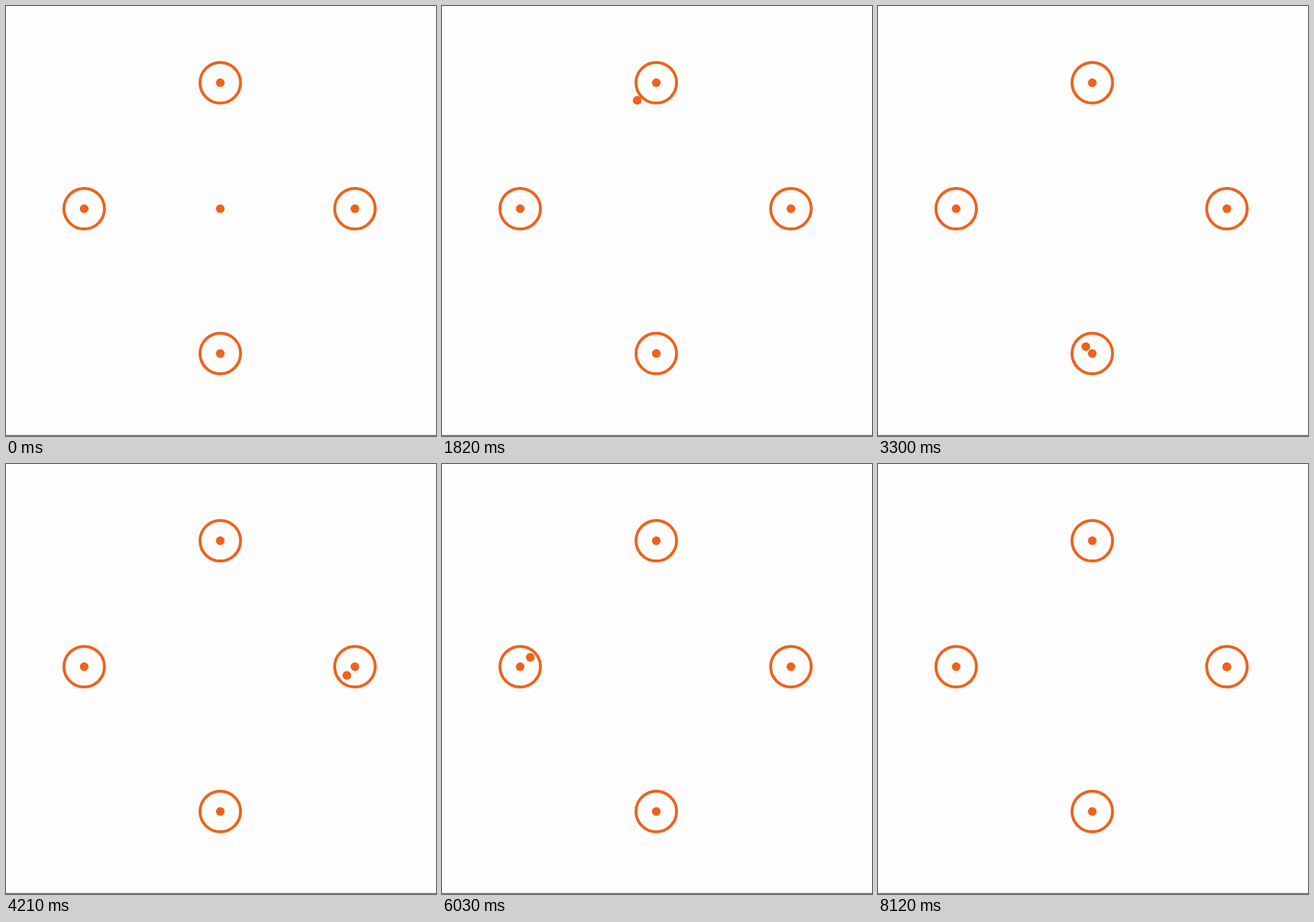
Animation of 594 by 594 pixels, one loop 8.15 s. Source, as an HTML page:

```html
<!DOCTYPE html>
<html lang="en">
<head>
<meta charset="utf-8">
<title>Orbiting dot</title>
<style>
  html, body { margin: 0; width: 100%; height: 100%; overflow: hidden; background: #fdfdfd; }
  svg { display: block; width: 100vw; height: 100vh; }
</style>
</head>
<body>
<svg viewBox="0 0 594 594">
  <defs>
    <g id="target">
      <circle r="28" fill="none" stroke="#ee621b" stroke-width="4"/>
      <circle r="6" fill="#f0621b"/>
    </g>
  </defs>
  <rect y="592.6" width="594" height="1.4" fill="#777"/>
  <use href="#target" x="296" y="106"/>
  <use href="#target" x="108" y="280"/>
  <use href="#target" x="296" y="480"/>
  <use href="#target" x="482" y="280"/>
  <circle id="dot" cx="296" cy="280" r="6" fill="#f0621b"/>
</svg>
<script>
const LOOP = 8150, MOVE = 900;
const center = [296, 280], right = [482, 280], top_ = [296, 106], left = [108, 280], bottom = [296, 480];
const stops = [center, right, top_, left, bottom, right, top_, left, bottom, right];
// Start time of each leg between neighbouring stops
const starts = [165, 802, 1707, 2645, 3582, 4505, 5429, 6350, 7268];
const dot = document.getElementById("dot");

const bezier = (a, b, s) => 3 * (1 - s) ** 2 * s * a + 3 * (1 - s) * s * s * b + s ** 3;

// cubic-bezier(.25, .1, .25, 1)
function ease(u) {
  let lo = 0, hi = 1;
  for (let i = 0; i < 24; i++) {
    const mid = (lo + hi) / 2;
    if (bezier(.25, .25, mid) < u) lo = mid; else hi = mid;
  }
  return bezier(.1, 1, lo);
}

function position(t) {
  const leg = starts.findLastIndex(s => s <= t);
  if (leg < 0) return center;
  const next = starts[leg + 1] ?? Infinity;
  const length = Math.min(MOVE, next - starts[leg]);
  const p = ease(Math.min(1, (t - starts[leg]) / length));
  return stops[leg].map((v, i) => v + (stops[leg + 1][i] - v) * p);
}

function draw() {
  const [x, y] = position(performance.now() % LOOP);
  dot.setAttribute("cx", x);
  dot.setAttribute("cy", y);
  requestAnimationFrame(draw);
}
draw();
</script>
</body>
</html>
```
